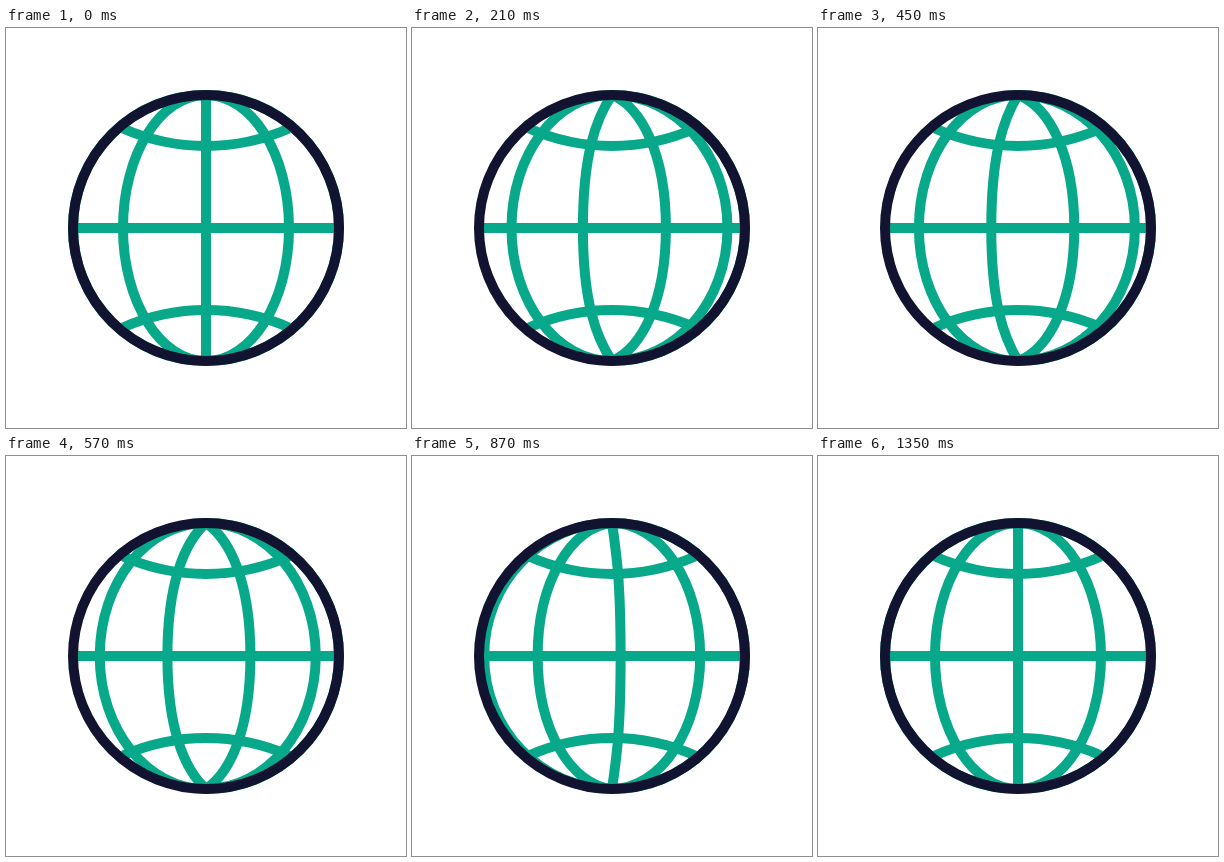
Animation of 400x400 px, one loop 1470 ms. Source, as an HTML page:

```html
<!DOCTYPE html>
<html lang="en">
<head>
<meta charset="utf-8">
<title>Spinning globe</title>
<style>
  html, body { margin: 0; height: 100%; overflow: hidden; background: #fff; }
  svg { display: block; width: 100vw; height: 100vh; }
</style>
</head>
<body>
<svg viewBox="-200 -200 400 400" fill="none" stroke-width="10">
  <g stroke="#08a88a">
    <path d="M-133 0H133M-83 -99.5A206 206 0 0 0 83 -99.5M-83 99.5A206 206 0 0 1 83 99.5"/>
    <path id="meridians"/>
  </g>
  <circle r="133" stroke="#121331"/>
</svg>
<script>
  const LOOP = 1470, SPIN = 1350, STEP = 30, TURNS = 7;
  const R = 133, INNER = 83, K = 0.5523;
  const meridians = document.getElementById('meridians');

  const bezier = (a, b, s) => 3 * a * s * (1 - s) ** 2 + 3 * b * s * s * (1 - s) + s ** 3;

  // Timing curve (0.167, 0.167, 0.457, 1), solved by bisection.
  function ease(x) {
    if (x >= 1) return 1;
    let lo = 0, hi = 1;
    for (let i = 0; i < 30; i++) {
      const mid = (lo + hi) / 2;
      if (bezier(0.167, 0.457, mid) < x) lo = mid; else hi = mid;
    }
    return bezier(0.167, 1, lo);
  }

  // Slots -2..2 map to the left rim, inner left, centre, inner right and right rim.
  function slotX(slot) {
    const d = Math.abs(slot);
    return Math.sign(slot) * (d < 1 ? INNER * d : INNER + (R - INNER) * (d - 1));
  }

  // Half ellipse whose poles grow pointed as it flattens into a line.
  function meridian(x) {
    const pole = R - 36 * Math.max(0, 1 - Math.abs(x) / INNER);
    const cx = K * x, cy = K * R;
    return `M0 ${-R}C${cx} ${-pole} ${x} ${-cy} ${x} 0S${cx} ${pole} 0 ${R}`;
  }

  function draw(now) {
    const t = Math.floor((now % LOOP) / STEP) * STEP;
    const phase = TURNS * ease(t / SPIN) % 1;
    meridians.setAttribute('d',
      [-2, -1, 0, 1, 2].map(i => meridian(slotX(Math.min(2, i + phase)))).join(''));
  }

  const start = performance.now();
  function frame() {
    draw(performance.now() - start);
    requestAnimationFrame(frame);
  }
  frame();
</script>
</body>
</html>
```
